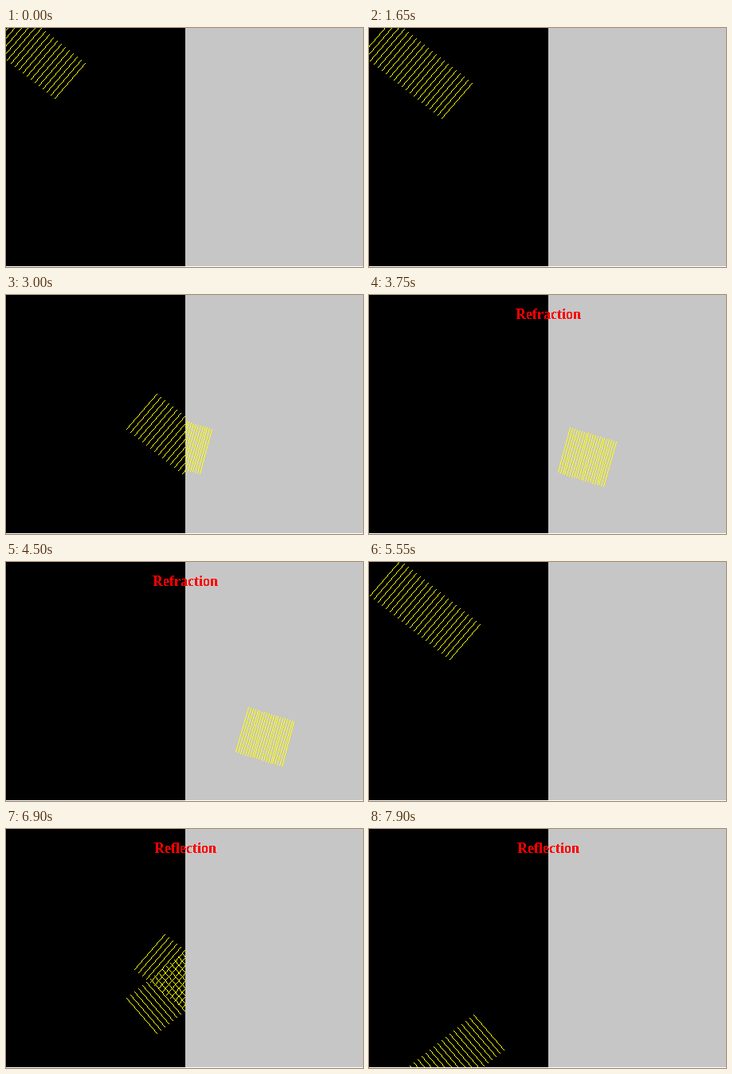
Recreate the animation shown at these times as an HTML page with a canvas. Size 448 px wide and 300 px high, loop 8000 ms.

```html
<!DOCTYPE html>
<html lang="en">
<head>
<meta charset="utf-8">
<title>Wavefronts at a boundary</title>
<style>
  html, body { margin: 0; width: 100%; height: 100%; overflow: hidden; background: #000; }
  canvas { display: block; width: 100vw; height: 100vh; image-rendering: pixelated; }
</style>
</head>
<body>
<canvas id="stage" width="448" height="300"></canvas>
<script>
const ctx = document.getElementById('stage').getContext('2d');
const W = 448, H = 300, EDGE = 225;
const LOOP = 8000, HOLD = 716, STEP = 1000 / 12;
const LAST_STEP = 86, CYCLE = 46, HOLD_POSE = 8;
const FRONTS = 21;

// Draws a steep one-pixel line without smoothing; place() maps or drops each x.
function steepLine(x0, y0, x1, y1, place) {
  for (let y = y0; y <= y1; y++) {
    const x = Math.ceil(x0 + (x1 - x0) * (y - y0) / (y1 - y0) - 0.5);
    const px = place(x);
    if (px !== null) ctx.fillRect(px, y, 1, 1);
  }
}

const inside = x => x >= EDGE ? x : null;
const outside = x => x < EDGE ? x : null;
const mirrored = x => x > EDGE ? 2 * EDGE - x : null;

function incidentFronts(n, place) {
  const tipX = 19 + 10 * n;
  const tipY = Math.floor(21.5 + 8.4 * n) - 44;
  for (let i = 0; i < FRONTS; i++) {
    const x = tipX - 5 * i, y = tipY - 4 * i;
    steepLine(x, y, x - 38, y + 44, place);
  }
}

function refractedFronts(n) {
  const tipX = 361.97 + 5.74 * (n - 45);
  const tipY = 200.5 + 1.77 * (n - 45);
  for (let i = 0; i < FRONTS; i++) {
    const x = tipX - 2.87 * i, y = Math.floor(tipY - 0.885 * i);
    steepLine(Math.floor(x), y, Math.floor(x - 15.6), y + 56, inside);
  }
}

// Renders a caption once, with hard pixel edges instead of smoothing.
function makeTitle(text) {
  const layer = document.createElement('canvas');
  layer.width = W;
  layer.height = 40;
  const c = layer.getContext('2d');
  c.font = 'bold 18px "Liberation Serif", serif';
  c.textAlign = 'center';
  c.fillStyle = '#f00';
  c.fillText(text, EDGE, 30);
  const image = c.getImageData(0, 0, W, layer.height);
  const d = image.data;
  for (let i = 0; i < d.length; i += 4) {
    const on = d[i + 3] > 110;
    d[i] = on ? 255 : 0;
    d[i + 1] = d[i + 2] = 0;
    d[i + 3] = on ? 255 : 0;
  }
  c.putImageData(image, 0, 0);
  return layer;
}

const refraction = makeTitle('Refraction');
const reflection = makeTitle('Reflection');

function draw(t) {
  const k = Math.min(LAST_STEP, Math.floor((t - HOLD) / STEP));
  const reflecting = k >= CYCLE;
  const n = k < 0 ? HOLD_POSE : k % CYCLE;

  ctx.fillStyle = '#000';
  ctx.fillRect(0, 0, EDGE, H);
  ctx.fillStyle = '#c6c6c6';
  ctx.fillRect(EDGE, 0, W - EDGE, H);

  ctx.fillStyle = '#ff0';
  incidentFronts(n, outside);
  if (reflecting) incidentFronts(n, mirrored);
  else refractedFronts(n);

  ctx.fillStyle = '#fff';
  ctx.fillRect(0, H - 1, W, 1);

  if (reflecting && n >= 25) ctx.drawImage(reflection, 0, 0);
  if (!reflecting && n >= 35) ctx.drawImage(refraction, 0, 0);
}

const start = performance.now();
function tick() {
  draw((performance.now() - start) % LOOP);
  requestAnimationFrame(tick);
}
tick();
</script>
</body>
</html>
```
